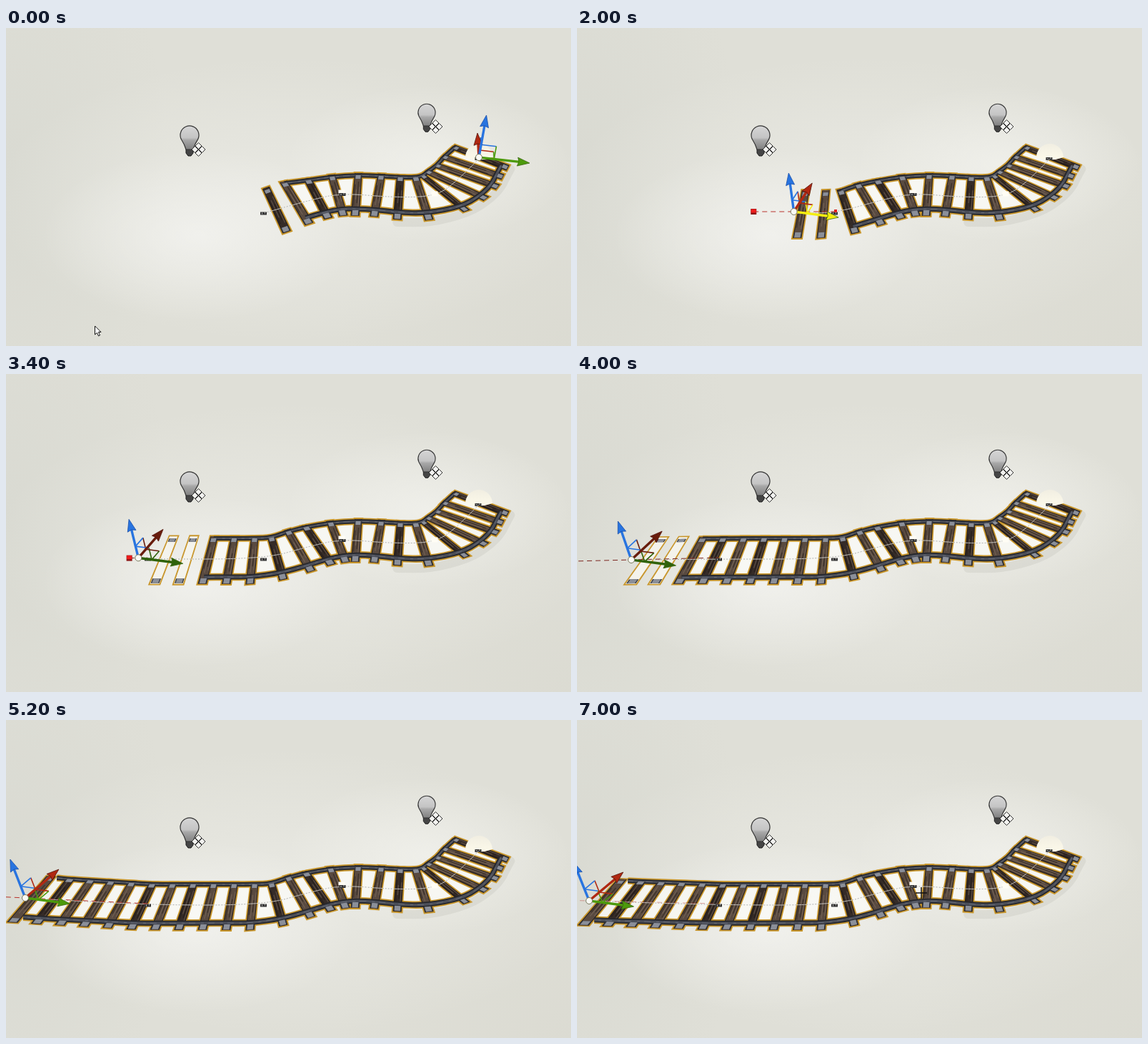
Recreate the animation shown at these times as an HTML page with a canvas. Size 791 by 445 pixels, loop 7.1 s.

```html
<!DOCTYPE html>
<html lang="en">
<head>
<meta charset="utf-8">
<title>Spline track</title>
<style>
html, body { margin: 0; width: 100%; height: 100%; overflow: hidden; background: #dfdfd7; }
canvas { display: block; }
</style>
</head>
<body>
<canvas id="stage" width="791" height="445"></canvas>
<script>
const c = document.getElementById('stage').getContext('2d');
const LOOP = 7100, STEP = 100;
const OUTLINE = '#c8962c';
const clamp = v => Math.max(0, Math.min(1, v));
const mix = (a, b, k) => a + (b - a) * k;
const ease = k => k * k * (3 - 2 * k);

// Selected spline point: time, x, y
const dragPath = [[1600, 361, 257], [2600, 198, 257], [3250, 198, 257], [4000, 76, 260],
  [4500, 24, 287], [5200, 27, 249], [5700, 15, 250], [6300, 15, 250], [6600, 17, 253]];
// Tie plates, from the far right: upper x, y, lower x, y
const fixedTies = [[630, 168, 698, 194], [615, 181, 691, 207], [605, 193, 684, 221], [592, 202, 668, 237],
  [585, 208, 641, 253], [574, 211, 591, 264], [552, 211, 548, 263], [525, 209, 516, 259], [493, 208, 489, 258]];
const endTies = [[457, 210, 471, 258], [424, 215, 449, 262], [391, 219, 422, 270], [366, 228, 391, 281]];
const joinedTies = [[455, 210, 474, 259], [421, 216, 453, 263], [396, 222, 425, 272], [372, 231, 387, 283]];

function along(path, t) {
  if (t <= path[0][0]) return path[0].slice(1);
  for (let i = 1; i < path.length; i++) {
    const [a, b] = [path[i - 1], path[i]];
    if (t <= b[0]) {
      const k = ease((t - a[0]) / (b[0] - a[0]));
      return [mix(a[1], b[1], k), mix(a[2], b[2], k)];
    }
  }
  return path[path.length - 1].slice(1);
}

function strokePath(color, width, dash) {
  c.setLineDash(dash);
  c.strokeStyle = color;
  c.lineWidth = width;
  c.stroke();
  c.setLineDash([]);
}

function line(points, color, width, dash = []) {
  c.beginPath();
  points.forEach(p => c.lineTo(p[0], p[1]));
  strokePath(color, width, dash);
}

function curve(pts, color, width, dash = []) {
  c.beginPath();
  c.moveTo(...pts[0]);
  for (let i = 1; i < pts.length - 1; i++) {
    const [a, b] = [pts[i], pts[i + 1]];
    c.quadraticCurveTo(a[0], a[1], (a[0] + b[0]) / 2, (a[1] + b[1]) / 2);
  }
  c.lineTo(...pts[pts.length - 1]);
  strokePath(color, width, dash);
}

function shape(points, fill, stroke, width = 1) {
  c.beginPath();
  points.forEach(p => c.lineTo(p[0], p[1]));
  c.closePath();
  c.fillStyle = fill;
  c.fill();
  if (stroke) strokePath(stroke, width, []);
}

// Quad from a to b whose ends are cut along the vectors va and vb
function slab(a, b, va, vb, width, color) {
  const end = (p, v, s) => [p[0] + v[0] * width * s, p[1] + v[1] * width * s];
  shape([end(a, va, -1), end(a, va, 1), end(b, vb, 1), end(b, vb, -1)], color);
}

function box(x, y, w, h, color) {
  c.fillStyle = color;
  c.fillRect(x - w / 2, y - h / 2, w, h);
}

function glow(x, y, rx, ry, color, alpha) {
  c.save();
  c.translate(x, y);
  c.scale(rx, ry);
  const g = c.createRadialGradient(0, 0, 0, 0, 0, 1);
  g.addColorStop(0, `rgba(${color},${alpha})`);
  g.addColorStop(0.5, `rgba(${color},${alpha * 0.5})`);
  g.addColorStop(1, `rgba(${color},0)`);
  c.fillStyle = g;
  c.fillRect(-1, -1, 2, 2);
  c.restore();
}

function background() {
  c.fillStyle = '#dfdfd7';
  c.fillRect(0, 0, 791, 445);
  glow(0, 210, 230, 420, '208,210,202', 0.4);
  glow(791, 445, 330, 260, '214,213,203', 0.4);
  glow(400, 240, 420, 200, '240,240,235', 0.6);
  glow(270, 290, 220, 120, '248,248,246', 0.6);
  glow(590, 190, 200, 110, '248,248,244', 0.55);
}

function moveIcon(x, y) {
  for (const [dx, dy] of [[0, -5], [5, 0], [0, 5], [-5, 0]]) {
    shape([[x + dx, y + dy - 4.5], [x + dx + 4.5, y + dy], [x + dx, y + dy + 4.5], [x + dx - 4.5, y + dy]], '#f4f4f0', '#333');
  }
}

function bulb(x, y, s) {
  c.save();
  c.translate(x, y);
  c.scale(s, s);
  shape([[-5, 14], [5, 14], [5, 20], [2, 24], [-2, 24], [-5, 20]], '#454545', '#1c1c1c');
  const g = c.createLinearGradient(0, -18, 0, 15);
  g.addColorStop(0, '#d6d6d6');
  g.addColorStop(0.5, '#c4c4c4');
  g.addColorStop(0.6, '#a8a8a8');
  g.addColorStop(1, '#808080');
  c.beginPath();
  c.arc(0, -5, 13, Math.PI * 0.87, Math.PI * 0.13);
  c.quadraticCurveTo(7, 8, 5, 15);
  c.lineTo(-5, 15);
  c.quadraticCurveTo(-7, 8, -12, 0);
  c.closePath();
  c.fillStyle = g;
  c.fill();
  strokePath('#333', 1.2, []);
  c.restore();
  moveIcon(x + 12.5, y + 15);
}

function makeTies([px, py]) {
  const join = ease(clamp((361 - px) / 90));
  const ties = fixedTies.concat(endTies.map((tie, i) => tie.map((v, j) => mix(v, joinedTies[i][j], join))));
  const sag = x => px < 198 ? (py - 259) * Math.max(0, (198 - x) / (198 - px)) : 0;
  for (let k = 0; 346 - 31 * k > px + 8; k++) {
    const shift = sag(346 - 31 * k);
    ties.push([348 - 28.8 * k, 232 + shift, 342 - 33 * k, 289 + shift]);
  }
  return ties.map(([ux, uy, lx, ly], i) => {
    const len = Math.hypot(lx - ux, ly - uy), dx = (lx - ux) / len, dy = (ly - uy) / len;
    const before = ties[Math.max(0, i - 1)], after = ties[Math.min(ties.length - 1, i + 1)];
    const cut = (j, half) => {
      const rx = after[j] - before[j], ry = after[j + 1] - before[j + 1], r = Math.hypot(rx, ry);
      const scale = half / r / Math.max(0.7, Math.abs(rx * dy - ry * dx) / r);
      return [rx * scale, ry * scale];
    };
    return {
      dx, dy, width: i < 5 ? 8 : 11, dark: i % 2 === 0 && i % 6 !== 2,
      upper: d => [ux + dx * d, uy + dy * d], lower: d => [lx + dx * d, ly + dy * d],
      upperCut: cut(0, 0.47), lowerCut: cut(2, 0.55)
    };
  });
}

function plank(o, color, grow, extend) {
  slab(o.upper(-5 - extend), o.lower(5 + extend), o.upperCut, o.lowerCut, o.width + grow, color);
}

function grain(o, i) {
  for (let j = 0; j < 4; j++) {
    const s = (j - 1.5) * o.width / 5, a = 4 + (i * 17 + j * 11) % 18;
    const ends = [o.upper(a), o.lower(-8 - (i * 7 + j * 5) % 14)];
    line(ends.map(([x, y]) => [x - o.dy * s, y + o.dx * s]), j % 2 ? 'rgba(20,14,12,.4)' : 'rgba(150,128,112,.35)', 1.4);
  }
}

function track(t, p) {
  const ties = makeTies(p);
  const loose = t < 1700 || p[0] < 40 ? 1 : 2;
  const railed = ties.slice(0, -loose);
  const rails = [railed.map(o => o.upper(-2)), railed.map(o => o.lower(-5))];
  if (p[0] < 40) {
    const last = ties[ties.length - 1], [u, l] = [last.upper(-2), last.lower(-5)];
    rails[0].push([u[0] + 10, u[1]]);
    rails[1].push([l[0] + 9, l[1]]);
  }
  const hollow = i => t >= 3300 && t <= 4800 && i >= ties.length - loose;
  const width = i => i ? 7 : 6;

  c.lineCap = 'round';
  curve(railed.slice(0, 7).map(o => o.lower(9)), 'rgba(170,170,158,.2)', 12);
  c.lineCap = 'butt';
  shape(rails[0].concat(rails[1].slice().reverse()), 'rgba(253,253,248,.72)');

  ties.forEach(o => plank(o, OUTLINE, 3.5, 2));
  rails.forEach((r, i) => curve(r, OUTLINE, width(i) + 3.5));
  ties.forEach((o, i) => {
    plank(o, hollow(i) ? '#f4f3ec' : '#241d1b', 0, 0);
    if (hollow(i)) return;
    plank(o, o.dark ? '#352b27' : '#594a40', -2, 0);
    grain(o, i);
  });
  rails.forEach((r, i) => {
    curve(r, '#25262b', width(i));
    curve(r, '#4b4e58', width(i) - 3.5);
    curve(r, 'rgba(125,130,145,.5)', 1, [9, 6, 4, 8]);
  });
  ties.forEach(o => {
    for (const [a, b, cut] of [[o.upper(-2), o.upper(3), o.upperCut], [o.lower(-3), o.lower(4), o.lowerCut]]) {
      slab(a, b, cut, cut, o.width - 1, '#34363c');
      slab(a, b, cut, cut, o.width - 3.5, '#8b8f99');
    }
  });
}

function pointMark(x, y) {
  box(x, y, 9, 4, '#353535');
  box(x - 2, y, 1, 2, '#bbb');
  box(x + 2, y - 1, 1, 2, '#bbb');
}

function spline(t, p) {
  const pts = [[662, 183], [630, 216], [600, 236], [540, 237], [470, 231], [425, 241], [361, 259]];
  if (p[0] < 350) pts.push([Math.max(p[0], 198), 259]);
  if (p[0] < 190) pts.push(p);
  curve(pts, 'rgba(248,248,244,.75)', 1);
  curve(pts, 'rgba(110,110,110,.55)', 1, [2, 2]);
  box(600, 232, 9, 7, '#fffdf5');
  box(470, 229, 9, 5, '#fffdf5');
  pointMark(471, 233);
  if (t < 900 || p[0] < 350) pointMark(360.5, 259.5);
  if (t >= 3300) pointMark(198.5, 259.5);
}

function dome() {
  c.beginPath();
  c.ellipse(662, 181, 19, 19, 0, Math.PI, 0);
  c.quadraticCurveTo(662, 188, 643, 181);
  const g = c.createLinearGradient(0, 162, 0, 184);
  g.addColorStop(0, '#f1eee2');
  g.addColorStop(1, '#fcf9ea');
  c.fillStyle = g;
  c.fill();
  pointMark(661, 183);
}

function handles(t, p, dragging) {
  const prev = t < 1700 ? [483, 229] : t < 3300 ? [360, 257] : [198, 257];
  const end = [2 * p[0] - prev[0], 2 * p[1] - prev[1]];
  c.globalAlpha = t > 6400 ? 0.4 : 1;
  line([end, prev], dragging ? '#7c2620' : '#b8322c', 1, [7, 5]);
  c.globalAlpha = 1;
  box(end[0], end[1], 8, 8, '#8c1414');
  box(end[0], end[1] - 1, 7, 5, '#ee1c1c');
  if (t >= 1700 && t < 3300) box(362, 256, 4, 4, '#e02020');
}

function arrow([x, y], [dx, dy], color, edge) {
  const len = Math.hypot(dx, dy), u = dx / len, v = dy / len;
  const at = (d, s) => [x + u * d - v * s, y + v * d + u * s];
  line([at(3, 0), at(len - 14, 0)], color, 3.4);
  shape([at(len, 0), at(len - 17, 6), at(len - 15, 0), at(len - 17, -6)], color, edge, 0.8);
}

function gizmo(t, [x, y], dragging) {
  const far = x > 500;
  const blue = [x * 0.05 - 22.5, far ? -59 : -54];
  const red = [49 - x * 0.077, far ? -34 : -40];
  const green = [far ? 71 : 62.5, 8];
  const hot = t >= 1000 && t < 2600;
  const axes = [[red, dragging ? '#681c0c' : '#b02812', '#54150c'],
    [blue, '#2874e0', '#1a4fa8'],
    [green, hot ? '#f4ee10' : dragging ? '#2f620a' : '#4c9a0c', '#3a6610']];
  for (const [i, j] of [[0, 1], [1, 2], [0, 2]]) {
    const [a, colorA] = axes[i], [b, colorB] = axes[j], k = 0.3;
    const corner = [x + (a[0] + b[0]) * k, y + (a[1] + b[1]) * k];
    line([[x + a[0] * k, y + a[1] * k], corner], colorA, 1.6);
    line([[x + b[0] * k, y + b[1] * k], corner], colorB, 1.6);
  }
  axes.forEach(([dir, color, edge]) => arrow([x, y], dir, color, edge));
  c.beginPath();
  c.arc(x, y, 4.5, 0, 7);
  c.fillStyle = '#fafaf4';
  c.fill();
  strokePath('#77775c', 1, []);
}

function cursor(t) {
  if (t < 900) {
    const k = ease(clamp(t / 850)), x = mix(124.5, 360, k), y = mix(417, 258, k);
    const outline = [[0, 0], [0, 12], [3, 9.5], [5, 14], [7, 13], [5, 8.5], [8.5, 8.5]];
    shape(outline.map(([a, b]) => [x + a, y + b]), '#fff', '#111');
  } else if (t < 1700) {
    moveIcon(373, 266);
  } else if (t >= 6500) {
    const k = ease(clamp((t - 6400) / 550)), x = mix(80, 482, k), y = mix(258, 242, k);
    line([[x - 8, y], [x + 8, y]], '#111', 1.5);
    line([[x, y - 8], [x, y + 8]], '#111', 1.5);
  }
}

function draw(now) {
  const t = Math.floor(now % LOOP / STEP) * STEP;
  const p = along(dragPath, t);
  const dragging = t >= 3300 && t < 4900;
  background();
  track(t, p);
  dome();
  spline(t, p);
  bulb(257, 155, 1);
  bulb(589, 123, 0.93);
  if (t >= 900) handles(t, p, dragging);
  gizmo(t, t < 900 ? [662, 181] : p, dragging);
  cursor(t);
}

const start = performance.now();
(function loop() {
  draw(performance.now() - start);
  requestAnimationFrame(loop);
})();
</script>
</body>
</html>
```
